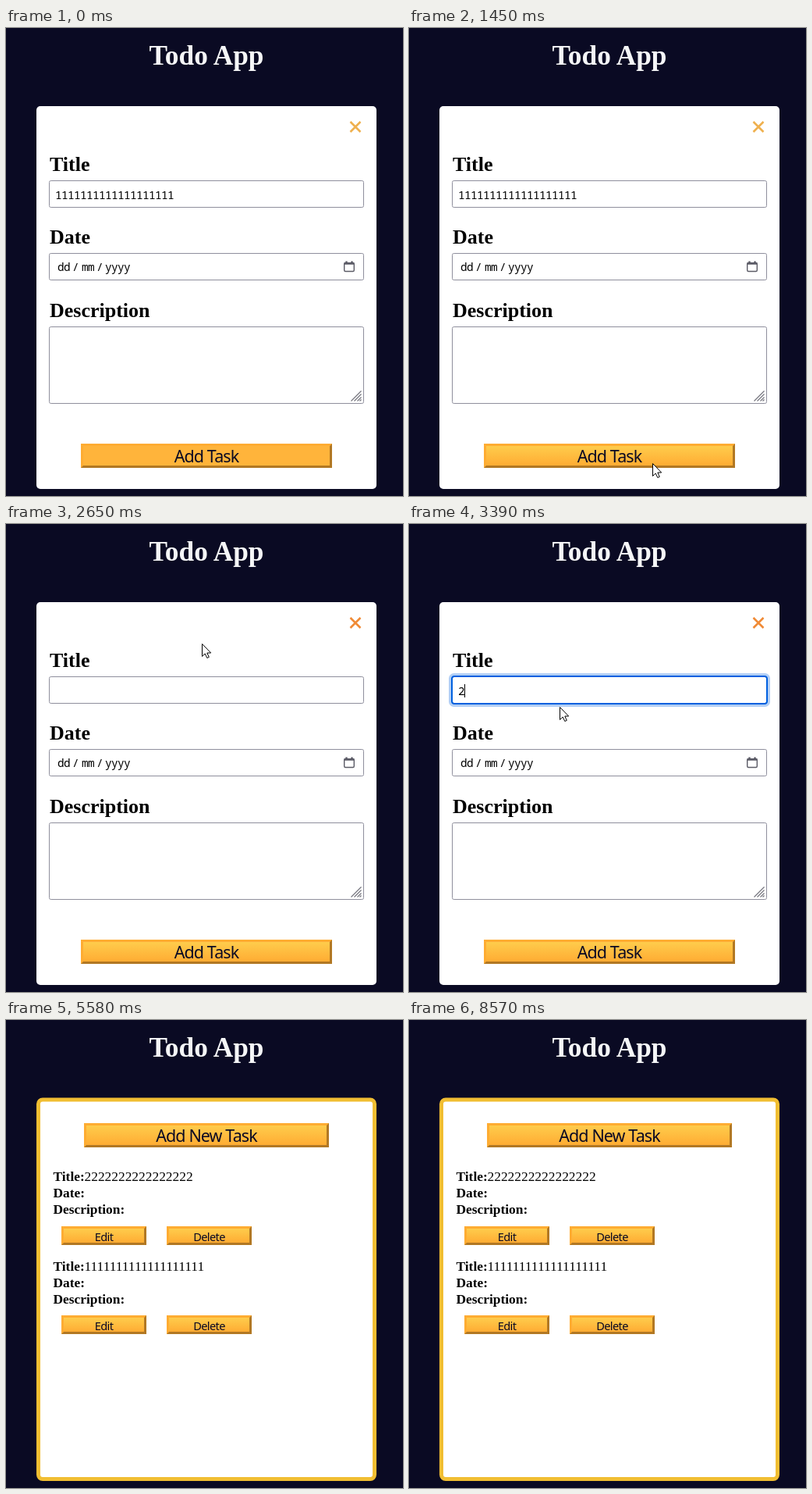
An HTML page for the animation above (8.91 s loop, 509x599 px).

```html
<!DOCTYPE html>
<html lang="en">
<head>
<meta charset="utf-8">
<title>Todo App</title>
<style>
  html, body { margin: 0; width: 100%; height: 100%; overflow: hidden; background: #0a0a23; }
  svg { display: block; width: 509px; height: 599px; }
  text { white-space: pre; }
  .head { font: bold 35.3px "Liberation Serif", serif; fill: #f5f6f7; text-anchor: middle; }
  .label { font: bold 26px "Liberation Serif", serif; }
  .item { font: 17.4px "Liberation Serif", serif; }
  .key { font-weight: bold; }
  .mono { font: 14.4px "Noto Sans Mono", monospace; letter-spacing: -.64px; }
  .big { font: 21.5px "Noto Sans", sans-serif; letter-spacing: -.9px; }
  .small { font: 14.6px "Noto Sans", sans-serif; letter-spacing: -.65px; }
  .big, .small { fill: #0a0a23; text-anchor: middle; }
  .field { fill: #fff; stroke: #8f8f9d; }
</style>
</head>
<body>
<svg viewBox="0 0 509 599">
  <defs>
    <linearGradient id="gold" x2="0" y2="1">
      <stop stop-color="#fecc4c"/><stop offset="1" stop-color="#ffac33"/>
    </linearGradient>
  </defs>
  <rect width="509" height="599" fill="#0a0a23"/>
  <text class="head" x="257" y="47">Todo App</text>

  <g id="form">
    <rect x="39" y="100" width="436" height="490" rx="5" fill="#fff"/>
    <path id="close" d="M441.500 120l13 13m0-13l-13 13" stroke-width="2.500"/>
    <g id="fields"></g>
    <g id="focus" fill="none">
      <rect x="52.500" y="192.500" width="409" height="40" rx="5" stroke="#b3cff5" stroke-width="3"/>
      <rect x="55" y="195" width="404" height="35" rx="3" stroke="#0060df" stroke-width="2"/>
      <path id="caret" stroke="#000"/>
    </g>
    <text class="mono" id="value" x="63" y="219"></text>
    <text class="mono" y="311"><tspan x="66">dd</tspan><tspan x="85">/</tspan><tspan x="97">mm</tspan><tspan x="116">/</tspan><tspan x="127">yyyy</tspan></text>
    <g fill="none" stroke="#5b5b66">
      <rect x="433.700" y="300.700" width="12.600" height="10.800" rx="1.500" stroke-width="1.400"/>
      <path d="M433.500 301.500h13M436.500 298.500v3m7-3v3" stroke-width="2.500"/>
    </g>
    <path d="M442.500 477.500l13-13m-9 13l9-9m-5 9l5-5m-2 5l2-2" fill="none" stroke="#77777f" stroke-width="1.300"/>
  </g>

  <g id="list">
    <rect x="41.500" y="102" width="431" height="485.500" rx="5.500" fill="#fff" stroke="#f1be32" stroke-width="5"/>
  </g>

  <path id="cursor" d="M.5.5v16l3.700-3.500 2.600 5.500 2.500-1.100-2.500-5.400h4.900z" fill="#fff" stroke="#000"/>
</svg>
<script>
const $ = id => document.getElementById(id);
const LOOP = 8910, STEP = 1000 / 15;
const ONES = '1'.repeat(19), TWOS = '2'.repeat(16);
const clamp = (v, lo, hi) => Math.max(lo, Math.min(hi, v));

function add(parent, tag, attrs = {}, text = '') {
  const el = document.createElementNS('http://www.w3.org/2000/svg', tag);
  for (const k in attrs) el.setAttribute(k, attrs[k]);
  el.textContent = text;
  parent?.append(el);
  return el;
}

// Gradient face with a 3px outset bevel
function button(parent, x, y, w, h, label, cls) {
  const g = add(parent, 'g', { transform: `translate(${x} ${y})` });
  add(g, 'rect', { width: w, height: h, fill: '#feac32' });
  add(g, 'path', { d: `M0 ${h}H${w}V0l-3 3V${h - 3}H3z`, fill: '#b27823' });
  const face = add(g, 'rect', { x: 3, y: 3, width: w - 6, height: h - 6, fill: 'url(#gold)' });
  add(g, 'text', { class: cls, x: w / 2, y: Math.round(h * .78) }, label);
  return face;
}

function task(title, row) {
  const g = add($('list'), 'g'), y = 206 + 115 * row;
  ['Title:', 'Date:', 'Description:'].forEach((key, i) => {
    const line = add(g, 'text', { class: 'item', x: 60.5, y: y + 21 * i });
    add(line, 'tspan', { class: 'key' }, key);
    if (!i) add(line, 'tspan', { x: 100.5 }, title);
  });
  ['Edit', 'Delete'].forEach((label, i) =>
    button(g, 71 + 135 * i, 264 + 114 * row, 109, 24, label, 'small'));
  return g;
}

['Title', 'Date', 'Description'].forEach((name, i) => {
  const y = Math.round(195 + 93.4 * i);
  add($('fields'), 'text', { class: 'label', x: 56, y: y - 12 }, name);
  add($('fields'), 'rect', { class: 'field', x: 55.5, y: y + .5, width: 403, height: i < 2 ? 34 : 98, rx: 2 });
});
const addFace = button($('form'), 96, 532, 322, 31, 'Add Task', 'big');
button($('list'), 100, 132, 314, 31, 'Add New Task', 'big');
const single = task(ONES, 0);
const pair = [task(TWOS, 0), task(ONES, 1)];

// Pointer strokes; the pointer rests at the end of each one
const moves = [];
function move(from, to, d) {
  const path = add(null, 'path', { d });
  moves.push({ from, to, path, length: path.getTotalLength() });
}
move(170, 500, 'M454 565Q330 510 174 288');
move(530, 1040, 'M174 288Q-90 240 310 575');
move(1170, 1640, 'M310 575L314 545');
move(1860, 2560, 'M314 545Q235 300 251 153');
move(2670, 3110, 'M251 153Q255 200 178 206');
move(3300, 3760, 'M178 206L395 600');
move(4570, 4770, 'M388 575L360 545');
move(5300, 5540, 'M360 545L395 600');
move(6440, 7300, 'M419 546C150 330 190 220 240 231');
move(7500, 7700, 'M240 231L236 301');
move(7970, 8500, 'M236 301L457 600');

function pointer(t) {
  const m = moves.findLast(m => m.from <= t);
  if (!m) return null;
  const k = clamp((t - m.from) / (m.to - m.from), 0, 1);
  const p = m.path.getPointAtLength(m.length * k * k * (3 - 2 * k));
  return [Math.round(p.x), Math.round(p.y)];
}

const show = (el, on) => el.style.display = on ? '' : 'none';

function draw(time) {
  const t = Math.floor((time + 25) / STEP) * STEP - 25;
  const first = t < 1770, second = t >= 4830;
  const listed = second || (!first && t < 2570);
  show($('form'), !listed);
  show($('list'), listed);
  show(single, !second);
  pair.forEach(g => show(g, second));

  // One key press, then key repeat
  const typed = t < 3300 ? 0 : 1 + clamp(Math.floor((t - 3660) / 33), 0, 15);
  $('value').textContent = first ? ONES : TWOS.slice(0, typed);
  show($('focus'), t >= 3100);
  $('caret').setAttribute('d', `M${63.5 + 8 * typed} 205v17`);
  $('close').setAttribute('stroke', first ? '#efb04e' : '#f08a35');
  addFace.setAttribute('fill', t < 170 ? '#ffb43b' : 'url(#gold)');

  const p = pointer(t);
  show($('cursor'), p);
  if (p) $('cursor').setAttribute('transform', `translate(${p})`);
}

const start = performance.now();
function tick() {
  draw((performance.now() - start) % LOOP);
  requestAnimationFrame(tick);
}
tick();
</script>
</body>
</html>
```
